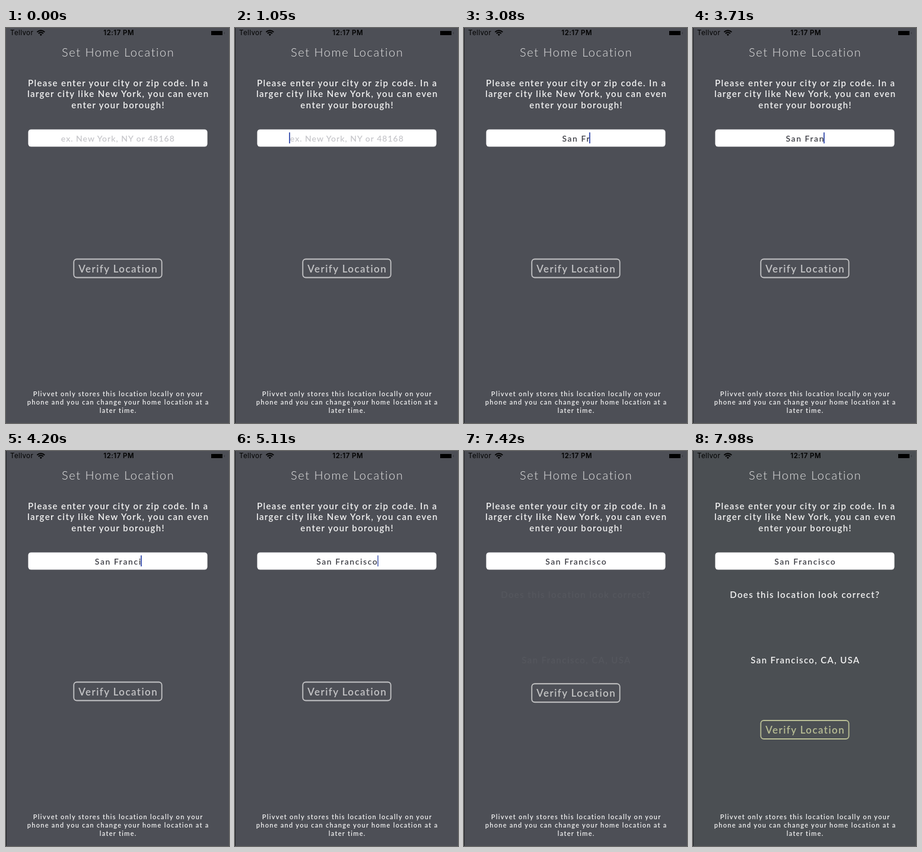
An HTML page that plays this animation: 376 by 664 pixels, repeating every 8000 ms.

```html
<!DOCTYPE html>
<html lang="en">
<head>
<meta charset="utf-8">
<title>Set Home Location</title>
<style>
  html, body { margin: 0; width: 100%; height: 100%; overflow: hidden; background: #4d4f56; }
  svg { display: block; width: 376px; height: 664px; }
  text { font-family: Lato, "Open Sans", sans-serif; font-weight: 600; fill: #f3f3f3; text-anchor: middle; white-space: pre; }
  .status { font: 400 11.5px Inter, Roboto, sans-serif; fill: #000; letter-spacing: .4px; text-anchor: start; }
  .clock { font-weight: 600; letter-spacing: .45px; text-anchor: middle; }
  .title { font-size: 20px; font-weight: 300; letter-spacing: 1.55px; fill: #e6e6e6; }
  .body { font-size: 15px; letter-spacing: 1.38px; }
  .note { font-size: 11px; letter-spacing: 1.28px; }
  .hint { font-size: 14px; letter-spacing: 1px; fill: #c7c7cb; }
  .typed { font-size: 14px; letter-spacing: 1.55px; fill: #3d3e45; }
  .label { font-size: 17px; letter-spacing: 1.4px; fill: currentColor; }
</style>
</head>
<body>
<svg viewBox="0 0 376 664">
  <rect id="bg" width="376" height="664" fill="#4d4f56"/>
  <rect id="edge" width="1" height="664" fill="#222327"/>

  <text class="status" x="7" y="12.3">Tellvor</text>
  <g fill="none" stroke="#000" stroke-width="2">
    <path d="M52.4 6.9a9 9 0 0 1 12.8 0M54.8 9.2a5.6 5.6 0 0 1 8 0"/>
    <path d="M58.8 13.2l-2-2.2a2.8 2.8 0 0 1 4 0z" fill="#000" stroke="none"/>
  </g>
  <text class="status clock" x="190.2" y="12.3">12:17 PM</text>
  <rect x="346" y="5" width="19" height="7" fill="#000"/>
  <rect x="367.5" y="7" width="1.5" height="3" fill="#000" opacity=".2"/>

  <text class="title" x="189.2" y="47.5">Set Home Location</text>
  <g class="body">
    <text x="189.2" y="97.5">Please enter your city or zip code. In a</text>
    <text x="189.2" y="116">larger city like New York, you can even</text>
    <text x="189.2" y="134.5">enter your borough!</text>
  </g>

  <rect x="37.4" y="170.4" width="302.2" height="29.2" rx="5" fill="#fff"/>
  <text id="hint" class="hint" x="188.8" y="190.5">ex. New York, NY or 48168</text>
  <text id="typed" class="typed" x="189.3" y="190.5"></text>
  <rect id="caret" y="175.5" width="2" height="18.5" fill="#4a5eb4"/>

  <g id="result" class="body">
    <text x="188.8" y="247">Does this location look correct?</text>
    <text x="189.5" y="357">San Francisco, CA, USA</text>
  </g>

  <g id="button">
    <rect x="114.3" y="388.5" width="148.4" height="31" rx="5" fill="none" stroke="currentColor" stroke-width="1.8"/>
    <text class="label" x="189.2" y="410.5">Verify Location</text>
  </g>

  <g class="note">
    <text x="189.2" y="619">Plivvet only stores this location locally on your</text>
    <text x="189.2" y="633">phone and you can change your home location at a</text>
    <text x="189.2" y="647">later time.</text>
  </g>
</svg>
<script>
const LOOP = 8000, FOCUS = 490, REVEAL = 7350;
const CITY = "San Francisco";
const KEYS = [2380, 2520, 2660, 2800, 2940, 3080, 3220, 3430, 3780, 4200, 4410, 4480, 4550];
const [bg, edge, hint, typed, caret, result, button] =
  ["bg", "edge", "hint", "typed", "caret", "result", "button"].map(id => document.getElementById(id));

const ramp = (t, from, to) => Math.min(1, Math.max(0, (t - from) / (to - from)));
const smooth = p => p * p * (3 - 2 * p);
const mix = (a, b, p) => `rgb(${a.map((v, i) => Math.round(v + (b[i] - v) * p))})`;

// Solid just after a key press, otherwise a soft one-second blink.
function caretAlpha(t, lastKey) {
  if (t < FOCUS || t >= REVEAL) return 0;
  if (t - lastKey < 300) return 1;
  const p = t % 1000;
  return Math.max(1 - ramp(p, 60, 280), ramp(p, 460, 650));
}

function draw(t) {
  const count = KEYS.filter(k => k <= t).length;
  const text = CITY.slice(0, count);
  if (typed.textContent !== text) typed.textContent = text;
  hint.style.display = count ? "none" : "";

  const width = count ? typed.getComputedTextLength() : 0;
  caret.setAttribute("x", count ? Math.round(187.4 + width / 2) : 91);
  caret.setAttribute("opacity", caretAlpha(t, count ? KEYS[count - 1] : -LOOP));

  const p = smooth(ramp(t, REVEAL, 7920));
  edge.setAttribute("opacity", t < 70 ? 0 : 1);
  bg.setAttribute("fill", mix([77, 79, 86], [75, 79, 83], p));
  result.setAttribute("opacity", p);
  button.setAttribute("transform", `translate(0 ${64.5 * p})`);
  button.style.color = mix([196, 196, 198], [184, 189, 148], p);
}

const start = performance.now();
function tick() {
  draw((performance.now() - start) % LOOP);
  requestAnimationFrame(tick);
}
tick();
</script>
</body>
</html>
```
